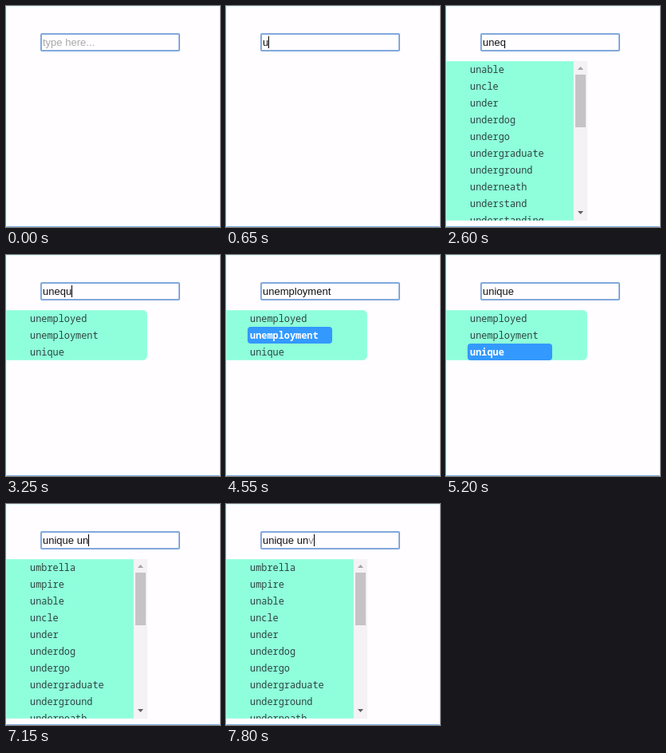
These frames come from a looping animation (268x277 px, 8 s). An HTML page:

```html
<!DOCTYPE html>
<html lang="en">
<head>
<meta charset="utf-8">
<title>Autocomplete</title>
<style>
  * { box-sizing: border-box; }
  html, body { margin: 0; width: 100%; height: 100%; overflow: hidden; background: #fffdff; }
  #stage { position: relative; width: 268px; height: 277px; overflow: hidden; background: #fffdff; }
  #edge { position: absolute; inset: 0; border: 1px solid #e2fafd; border-bottom-color: #7fafe2; }
  #field {
    position: absolute; left: 43px; top: 34px; width: 175px; height: 23px;
    border: 2px solid #82a8dc; border-radius: 2px; background: #fffdff; padding: 1px 0 0 1px;
    font: 13px/18px "Liberation Sans", Arial, sans-serif; color: #111; white-space: pre;
  }
  #field.empty { color: #a9a9a9; }
  #caret {
    display: inline-block; width: 1px; height: 15px; margin-top: 1px;
    vertical-align: top; background: #000;
  }
  #faint { color: #888; }
  #list {
    position: absolute; left: 0; top: 69px; width: 177px; max-height: 200px; overflow: hidden;
    background: #8fffdb; border-radius: 0 6px 6px 0; box-shadow: inset 0 0 0 1px #a6fde2;
    font: 11.9px/21px "Noto Sans Mono", Consolas, monospace; color: #2d453e;
  }
  #list.long { width: 160px; border-radius: 0; }
  .row { height: 21px; margin-left: 27px; width: 106px; padding-left: 3px; border-radius: 4px; white-space: pre; }
  .row.on { background: #3399ff; color: #fff; font-weight: bold; }
  #bar { position: absolute; left: 160px; top: 69px; }
</style>
</head>
<body>
<div id="stage">
  <div id="edge"></div>
  <div id="field"><span id="text"></span><span id="faint"></span><i id="caret"></i></div>
  <div id="list"></div>
  <svg id="bar" width="17" height="200">
    <rect width="17" height="200" fill="#f4f2f4"/>
    <rect x="2" y="17" width="13" height="66" fill="#c5c3c5"/>
    <path d="M5 11h7l-3.5-4z" fill="#a5a3a5"/>
    <path d="M5 188h7l-3.5 4z" fill="#606060"/>
  </svg>
</div>
<script>
const $ = id => document.getElementById(id);
const STEP = 650, LOOP = 8000;

const common = ["unable", "uncle", "under", "underdog", "undergo",
  "undergraduate", "underground", "underneath"];
const lists = {
  none: [],
  all: ["umbrella", "umpire", ...common],
  un: [...common, "understand", "understanding"],
  une: ["unemployed", "unemployment", "unique"]
};

// text, list, caret shown, selected row, trailing letter still fading in
const steps = [
  ["", "none", false],
  ["u", "none", true],
  ["un", "all", true],
  ["une", "all", true],
  ["uneq", "un", false],
  ["unequ", "une", true],
  ["unemployed", "une", false, 0],
  ["unemployment", "une", false, 1],
  ["unique", "une", false, 2],
  ["unique ", "none", true],
  ["unique u", "none", false],
  ["unique un", "all", true],
  ["unique un", "all", true, -1, "v"]
];

let shown = -1;

function show(i) {
  const [text, name, caret, selected = -1, faint = ""] = steps[i];
  const words = lists[name], long = words.length > 9;
  $("field").className = text ? "" : "empty";
  $("text").textContent = text || "type here...";
  $("faint").textContent = faint;
  $("caret").style.visibility = caret ? "visible" : "hidden";
  $("list").className = long ? "long" : "";
  $("list").replaceChildren(...words.map((word, n) => {
    const row = document.createElement("div");
    row.className = n === selected ? "row on" : "row";
    row.textContent = word;
    return row;
  }));
  $("bar").style.display = long ? "block" : "none";
}

function tick() {
  const i = Math.floor(performance.now() % LOOP / STEP);
  if (i !== shown) show(shown = i);
  requestAnimationFrame(tick);
}
tick();
</script>
</body>
</html>
```
